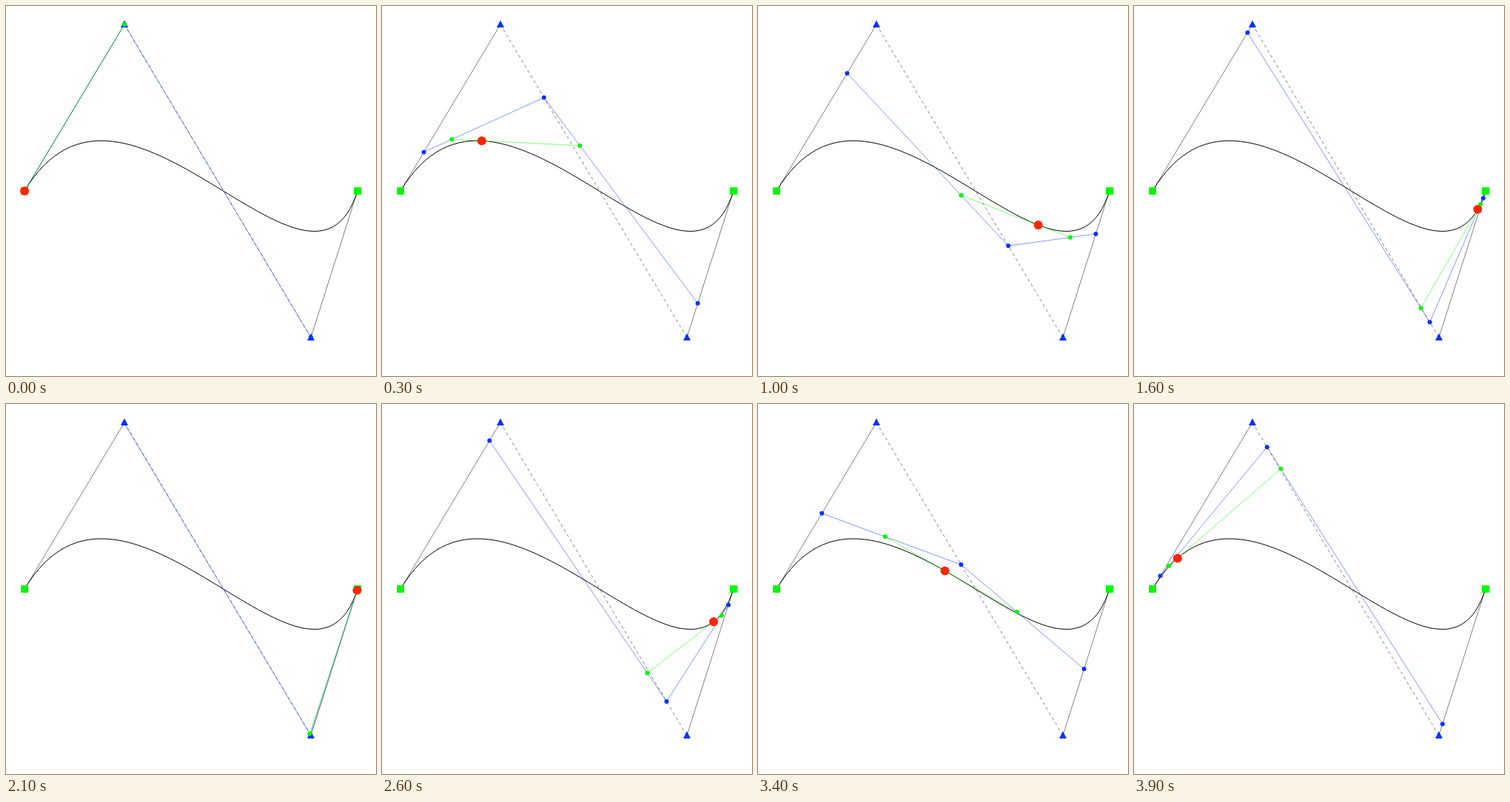
An HTML page with a canvas for the animation above (4 s loop, 500x500 px).

```html
<!DOCTYPE html>
<html lang="en">
<head>
<meta charset="utf-8">
<title>Cubic Bézier construction</title>
<style>
  html, body { margin: 0; width: 100%; height: 100%; overflow: hidden; background: #fff; }
  canvas { display: block; }
</style>
</head>
<body>
<canvas id="stage" width="500" height="500"></canvas>
<script>
const ctx = document.getElementById('stage').getContext('2d');
const LOOP = 4000, STEP = 100;
const RED = '#ff2600', GREEN = '#00f900', BLUE = '#0433ff';
const controls = [[25, 250], [160, 25], [412, 448], [475, 250]];
const [start, handleA, handleB, end] = controls;

// One level of de Casteljau's algorithm
const subdivide = (points, t) => points.slice(1).map((p, i) =>
  p.map((v, axis) => points[i][axis] + (v - points[i][axis]) * t));

function polyline(points, color, dash = []) {
  ctx.globalAlpha = 0.5;
  ctx.strokeStyle = color;
  ctx.setLineDash(dash);
  // Separate strokes let overlapping segments blend
  points.slice(1).forEach((p, i) => {
    ctx.beginPath();
    ctx.moveTo(...points[i]);
    ctx.lineTo(...p);
    ctx.stroke();
  });
  ctx.setLineDash([]);
  ctx.globalAlpha = 1;
}

function dot([x, y], radius, color) {
  ctx.fillStyle = color;
  ctx.beginPath();
  ctx.arc(x, y, radius, 0, 2 * Math.PI);
  ctx.fill();
}

function square([x, y]) {
  ctx.fillStyle = GREEN;
  ctx.fillRect(x - 5, y - 5, 10, 10);
}

function triangle([x, y]) {
  ctx.fillStyle = BLUE;
  ctx.beginPath();
  ctx.moveTo(x, y - 5.7);
  ctx.lineTo(x + 5, y + 4);
  ctx.lineTo(x - 5, y + 4);
  ctx.fill();
}

function draw(t) {
  const first = subdivide(controls, t);
  const second = subdivide(first, t);
  const [point] = subdivide(second, t);

  ctx.clearRect(0, 0, 500, 500);
  ctx.lineWidth = 1;
  polyline([start, handleA], '#000');
  polyline([handleA, handleB], '#000', [4, 4]);
  polyline([handleB, end], '#000');

  ctx.strokeStyle = '#000';
  ctx.beginPath();
  ctx.moveTo(...start);
  ctx.bezierCurveTo(...handleA, ...handleB, ...end);
  ctx.stroke();

  [start, end].forEach(square);
  [handleA, handleB].forEach(triangle);

  polyline(first, BLUE);
  polyline(second, GREEN);
  first.forEach(p => dot(p, 3, BLUE));
  second.forEach(p => dot(p, 3, GREEN));
  dot(point, 6, RED);
}

function tick() {
  const time = Math.floor(performance.now() % LOOP / STEP) * STEP;
  draw(Math.sin(Math.PI * time / LOOP));
  requestAnimationFrame(tick);
}
tick();
</script>
</body>
</html>
```
